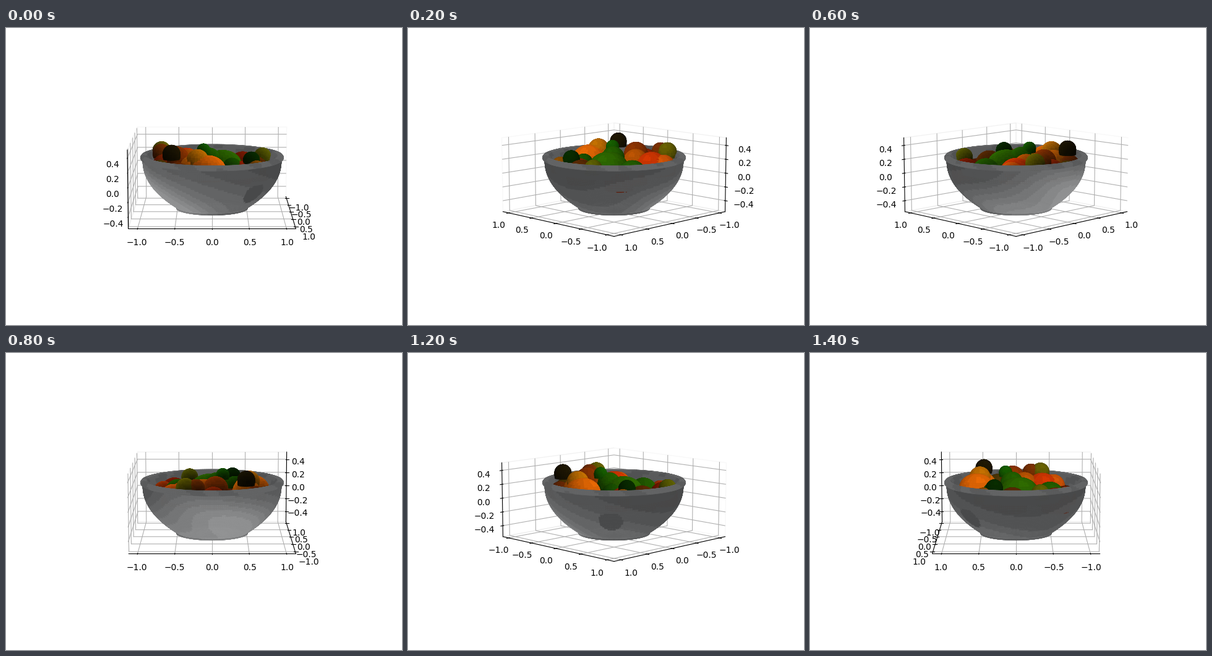
Animation of 640 by 480 pixels, one loop 1.6 s. Source, as a matplotlib script:

```python
import numpy as np
import matplotlib.pyplot as plt
from matplotlib.animation import FuncAnimation
from matplotlib.colors import to_rgb
from mpl_toolkits.mplot3d.art3d import Poly3DCollection

# Views follow the text order of their angles: 0, 135, 180, ..., 45, 90.
ANGLES = sorted(range(0, 360, 45), key=str)

# x, y, top, radius, colour
FOOD = [
    (.47, -.56, .475, .12, "#1c1503"),    # olives
    (.30, .55, .353, .115, "#082800"),
    (-.36, -.73, .40, .13, "#5c5602"),
    (-.22, -.73, .385, .12, "#6c2c03"),
    (-.33, .73, .313, .12, "#525402"),
    (.15, -.12, .445, .09, "#145400"),    # greens
    (.06, -.04, .37, .16, "#1f5400"),
    (-.04, .15, .32, .27, "#285c00"),
    (-.48, .12, .25, .20, "#1f5200"),
    (.33, .28, .27, .13, "#174800"),
    (.52, -.20, .42, .15, "#aa6202"),     # orange mound
    (.56, -.06, .34, .25, "#c85a04"),
    (.48, -.26, .33, .19, "#be5c06"),
    (-.38, -.38, .30, .22, "#b83002"),    # red mound
    (-.54, -.45, .27, .17, "#b84a06"),
    (-.12, -.32, .32, .18, "#a44a03"),
    (.05, -.50, .388, .17, "#7c2e02"),
    (-.55, .45, .22, .20, "#761a02"),
    (-.70, .25, .20, .14, "#9a3002"),
    (.05, .60, .25, .20, "#502603"),
    (.30, .38, .22, .18, "#841c02"),
    (.45, .62, .25, .13, "#7c4602"),
    (.28, -.73, .23, .14, "#443004"),
    (.02, -.68, .27, .17, "#7a2003"),
    (.60, -.48, .25, .14, "#5c2404"),
]


def quads(x, y, z):
    p = np.stack(np.broadcast_arrays(x, y, z), axis=-1)
    faces = np.stack([p[:-1, :-1], p[1:, :-1], p[1:, 1:], p[:-1, 1:]], axis=2)
    return faces.reshape(-1, 4, 3)


def unit(v):
    v = np.asarray(v)
    return v / np.linalg.norm(v, axis=-1, keepdims=True)


def bowl_profile():
    t = np.linspace(0, 1, 28)
    body = np.c_[.53 + .455 * (1 - (1 - t) ** 2.2), -.47 + .67 * t]
    foot = [(.47, -.515), (.51, -.505), (.515, -.48)]
    rim = [(1.01, .215), (1.015, .24), (1, .262), (.97, .27), (.93, .258),
           (.9, .22), (.88, .15), (.85, .05)]
    return np.vstack([foot, body, rim])


def bowl():
    profile = bowl_profile()
    az = np.linspace(0, 2 * np.pi, 217)
    r, z = profile[:, :1], profile[:, 1:]
    faces = quads(r * np.cos(az), r * np.sin(az), z)

    mid = (profile[1:] + profile[:-1]) / 2
    step = unit(np.diff(profile, axis=0))
    a = (az[1:] + az[:-1]) / 2
    nr, nz = step[:, 1:], -step[:, :1]
    mz = mid[:, 1:]
    light = unit([.1, -.55, -.83])
    lit = nr * (np.cos(a) * light[0] + np.sin(a) * light[1]) + nz * light[2]
    lit = lit + .07 * np.sin(3 * a + 6 * mz)
    gray = 78 + 66 * np.clip(lit, 0, 1) ** 1.5 + 10 * np.minimum(lit, 0)

    patch = ((np.degrees(a) - 42) / 11) ** 2 + ((mz + .18) / .14) ** 2 < 1
    gray = np.where(patch, 72, gray)
    gray = np.where(mz < -.47, gray + 13, gray)
    ripple = 6 * np.sin(9 * a + 20 * mz) * np.sin(4 * a)
    gray = np.where(mz > .2, 96 + ripple, gray)
    gray = np.where((nr < -.5) & (mz > 0), 86 + ripple, gray)
    gray = np.round(gray / 9) * 9
    rgb = np.stack([gray, gray + 1, gray + 2], axis=-1)
    return faces, rgb.reshape(-1, 3) / 255


def blob(x, y, top, radius, colour):
    height = min(radius, .2)
    lon = np.linspace(0, 2 * np.pi, 29)
    lat = np.linspace(.01, 1.9, 12)[:, None]
    nx, ny, nz = np.sin(lat) * np.cos(lon), np.sin(lat) * np.sin(lon), np.cos(lat)
    nz = np.where(nz < 0, 2 * nz, nz)    # the lower half runs down into the dish
    ball = quads(nx, ny, nz)
    light = unit(ball.mean(axis=1)) @ unit([-.2, .7, .65])
    shade = np.round((.72 + .42 * light) * 12) / 12
    faces = ball * (radius, radius, height) + (x, y, top - height)
    return faces, np.clip(shade[:, None] * to_rgb(colour), 0, 1)


def filling():
    r = np.linspace(.01, .86, 10)[:, None]
    az = np.linspace(0, 2 * np.pi, 49)
    faces = quads(r * np.cos(az), r * np.sin(az), .11)
    return faces, np.tile(to_rgb("#4a1803"), (len(faces), 1))


fig = plt.figure(figsize=(6.4, 4.8), dpi=100)
ax = fig.add_subplot(projection="3d")
ax.set(xlim=(-1.125, 1.125), ylim=(-1.125, 1.125), zlim=(-.5595, .5095))
ax.set_box_aspect((2.25, 2.25, 1.069))
for axis in (ax.xaxis, ax.yaxis, ax.zaxis):
    axis.pane.fill = False

parts = [bowl(), filling()] + [blob(*item) for item in FOOD]
faces = np.concatenate([part[0] for part in parts])
colours = np.concatenate([part[1] for part in parts])
ax.add_collection3d(Poly3DCollection(
    faces, facecolors=colours, edgecolors=colours, linewidths=.4))


def update(frame):
    ax.view_init(elev=10, azim=ANGLES[frame])
    return []


animation = FuncAnimation(fig, update, frames=len(ANGLES), interval=200,
                          repeat=True, repeat_delay=0)
plt.show()
```
